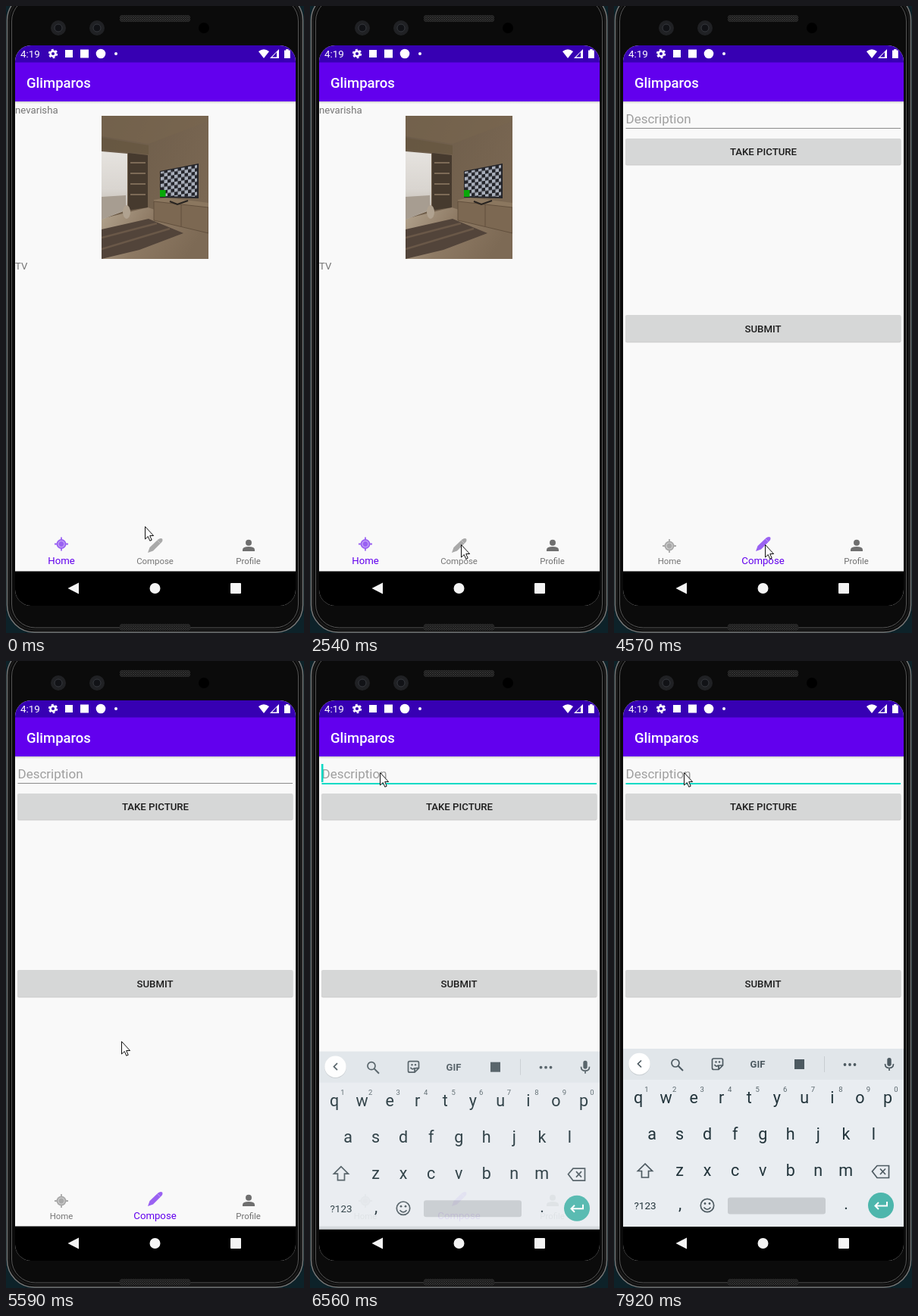
An HTML page that plays this animation: 393 px wide and 828 px high, repeating every 8 s.

```html
<!DOCTYPE html>
<html lang="en">
<head>
<meta charset="utf-8">
<title>Phone demo</title>
<style>
html, body { margin: 0; width: 100%; height: 100%; overflow: hidden; background: #0b0b0b; }
svg { display: block; width: 393px; height: 828px; font-family: Roboto, sans-serif; }
.mid { text-anchor: middle; }
.btn { font-size: 13.2px; font-weight: 500; fill: #1c1c1c; text-anchor: middle; }
.line { fill: none; stroke: #4d5a61; stroke-width: 1.7; }
.tab { fill: currentColor; }
</style>
</head>
<body>
<svg viewBox="0 0 393 828">
  <defs>
    <clipPath id="screen"><rect x="12" y="52" width="370" height="740" rx="21"/></clipPath>
    <clipPath id="page"><rect x="12" y="127" width="370" height="620"/></clipPath>
    <clipPath id="photoBox"><rect x="126" y="145" width="141" height="189"/></clipPath>
    <pattern id="checker" width="9" height="9" patternUnits="userSpaceOnUse" patternTransform="translate(204 217) skewY(-9)">
      <rect width="9" height="9" fill="#24252b"/>
      <path d="M0 0h4.5v9H9V4.5H0z" fill="#a9afbb"/>
    </pattern>
    <pattern id="mesh" width="3" height="3" patternUnits="userSpaceOnUse">
      <rect width="3" height="3" fill="#171717"/><path d="M0 0L3 3M3 0L0 3" stroke="#393939" stroke-width=".7"/>
    </pattern>
    <linearGradient id="shade" x2="0" y2="1"><stop stop-color="#cdcdcd"/><stop offset="1" stop-color="#f9f9f9"/></linearGradient>
    <linearGradient id="wall" x2="1" y2=".6"><stop stop-color="#6a5a48"/><stop offset="1" stop-color="#7b6853"/></linearGradient>
    <linearGradient id="floor" x2="1" y2=".3"><stop stop-color="#b3a48f"/><stop offset=".5" stop-color="#8d7963"/><stop offset="1" stop-color="#7d6a55"/></linearGradient>
    <linearGradient id="glass" x2="0" y2="1"><stop stop-color="#e6e3df"/><stop offset=".55" stop-color="#d9d5d0"/><stop offset="1" stop-color="#b9b0a5"/></linearGradient>
  </defs>

  <!-- phone body -->
  <rect width="393" height="828" fill="#0d2229"/>
  <g fill="#0b0b0b">
    <rect x="1.500" y="-17" width="390" height="844" rx="36" stroke="#777" stroke-width="1.500"/>
    <rect x="4" y="-14" width="385" height="838" rx="34" stroke="#1b1b1b" stroke-width="2"/>
    <rect x="7.500" y="-11" width="378" height="832" rx="31" stroke="#555"/>
  </g>
  <rect x="150" y="12" width="93" height="9" rx="3" fill="url(#mesh)"/>
  <rect x="150" y="816" width="93" height="9" rx="3" fill="url(#mesh)"/>
  <g fill="#202124"><circle cx="69" cy="29" r="10"/><circle cx="120" cy="29" r="10"/></g>
  <g fill="#111216" stroke="#36393e"><circle cx="69" cy="29" r="5"/><circle cx="120" cy="29" r="5"/></g>
  <circle cx="261" cy="29" r="7" fill="#000"/>

  <g clip-path="url(#screen)">
    <rect x="12" y="52" width="370" height="740" fill="#f9f9f9"/>
    <rect x="12" y="126" width="370" height="3" fill="url(#shade)"/>
    <rect x="12" y="74" width="370" height="52" fill="#6200ee"/>
    <rect x="12" y="52" width="370" height="22.5" fill="#3700b3"/>
    <g fill="#fff">
      <text x="19" y="68" font-size="13.4">4:19</text>
      <circle cx="62" cy="63" r="3.4" fill="none" stroke="#fff" stroke-width="2.6"/>
      <circle cx="62" cy="63" r="5.3" fill="none" stroke="#fff" stroke-width="1.8" stroke-dasharray="2.8 2.75"/>
      <rect x="78" y="58" width="10" height="10"/>
      <rect x="98" y="57.5" width="11" height="11"/>
      <circle cx="125" cy="63" r="6.3"/>
      <circle cx="145" cy="63" r="2"/>
      <path d="M333 60Q340 54.5 347 60L340 69z"/>
      <path d="M360 57V69H348z"/><path d="M357 61V67.5H351z" fill="#3700b3"/>
      <path d="M367 58.5h2.2V57h3.4v1.5h2.2V69H367z"/>
      <text x="27" y="108" font-size="18.5" font-weight="500">Glimparos</text>
    </g>

    <!-- feed -->
    <g id="feed" font-size="13.2" fill="#757575">
      <text x="12" y="141.5">nevarisha</text>
      <g clip-path="url(#photoBox)">
        <rect x="126" y="145" width="141" height="189" fill="url(#wall)"/>
        <path d="M126 145H267V152L188 182L126 172z" fill="#78674f" fill-opacity=".6"/>
        <path d="M126 174L188 184V196L126 190z" fill="#66563f" fill-opacity=".7"/>
        <path d="M126 281L187 266L267 292V334H126z" fill="url(#floor)"/>
        <path d="M126 192L160 195V269L126 282z" fill="url(#glass)"/>
        <path d="M126 252L158 250V269L126 282z" fill="#a79d91"/>
        <path d="M161 194L187 197V266L161 270z" fill="#463a2e"/>
        <path d="M164 207H184M164 221H184M164 235H184M164 249H184" stroke="#7d6b57" stroke-width="2"/>
        <path d="M126 295L188 281L234 300L176 322L126 334z" fill="#52443a"/>
        <path d="M126 306L199 287M126 321L216 294" stroke="#6a5848" stroke-width="2.500"/>
        <path d="M195 256L212 253L267 260V299L195 283z" fill="#8b775f"/>
        <path d="M195 258L267 266V300L195 283zM231 262V291" fill="#7c6852" stroke="#5b4938" stroke-width=".8"/>
        <ellipse cx="159" cy="272" rx="5" ry="9" fill="#b0a290"/>
        <path d="M203 218L254 208V254L203 253z" fill="#25252a"/>
        <path d="M204 219L252 210V252L204 251z" fill="url(#checker)"/>
        <path d="M216 258L226 262L240 257" fill="none" stroke="#272320" stroke-width="2"/>
        <rect x="203" y="243" width="7.5" height="9" fill="#08a808"/>
      </g>
      <text x="12" y="348">TV</text>
    </g>

    <!-- compose form -->
    <g id="form">
      <text x="15.5" y="154.500" font-size="17" fill="#9f9f9f">Description</text>
      <rect id="underline" x="15.5" y="161" width="362.5"/>
      <rect id="caret" x="15" y="136" width="2.500" height="24" fill="#03dac5"/>
      <g fill="#d0d0d0"><rect x="15" y="176" width="363.5" height="34.5" rx="2"/><rect x="15" y="409" width="363.5" height="35.5" rx="2"/></g>
      <g fill="#d6d7d7"><rect x="15" y="175" width="363.5" height="34" rx="2"/><rect x="15" y="408" width="363.5" height="35" rx="2"/></g>
      <text class="btn" x="197" y="197">TAKE PICTURE</text>
      <text class="btn" x="196.5" y="431">SUBMIT</text>
    </g>

    <!-- tabs -->
    <circle id="ripple" cx="197" cy="719.5" r="65.5" fill="#dbdbdb" clip-path="url(#page)"/>
    <g id="homeIcon" class="tab">
      <circle r="6.5"/>
      <path d="M0-9V9M-9 0H9" stroke="currentColor" stroke-width="1.8"/>
      <circle r="4" fill="none" stroke="#fff" stroke-opacity=".45" stroke-width="1.2"/>
    </g>
    <text id="homeLabel" class="mid" x="73" y="737">Home</text>
    <g id="composeIcon" class="tab">
      <path d="M-10 10L-7.5 3L3.5-7.5Q6.5-10 9-8.5Q10.5-6 7.5-3L-3 7.5z"/>
      <path d="M2.5-6.5L6.5-2.5" stroke="#fff" stroke-opacity=".35"/>
    </g>
    <text id="composeLabel" class="mid" x="196.5" y="737">Compose</text>
    <g fill="#6f6f6f">
      <circle cx="320" cy="708.7" r="4"/>
      <path d="M312 720V718Q312 714 320 714T328 718V720z"/>
      <text class="mid" x="319.5" y="737" font-size="11.4">Profile</text>
    </g>
    <rect x="12" y="746.500" width="370" height="46"/>

    <!-- keyboard -->
    <g id="keyboard" fill="#22343b">
      <rect x="12" y="512" width="370" height="235" fill="#e9edf1"/>
      <rect x="12" y="512" width="370" height="41" fill="#e1e6ea"/>
      <circle cx="33.5" cy="533" r="14.3" fill="#c9ced2"/>
      <circle cx="33.5" cy="532" r="14.2" fill="#fff"/>
      <g class="line">
        <path d="M36 527.5L31.5 532L36 536.5"/>
        <circle cx="81" cy="531" r="5"/><path d="M84.7 534.7L91 541" stroke-width="2"/>
        <path d="M131.5 525H141.5Q143.5 525 143.5 527V534L138 539.5H131.5Q129.5 539.5 129.5 537.5V527Q129.5 525 131.5 525zM143 534H140Q138 534 138 536V539M132.5 533Q135 537 138 533.5"/>
        <path d="M277.5 522V543" stroke="#c8cdd1" stroke-width="1"/>
        <path d="M357.5 532Q357.5 537.5 363 537.5T368.5 532M363 537.5V541"/>
        <path d="M41 664L31.5 673.5H36.5V682H45.5V673.5H50.5z"/>
        <path d="M340.5 674L347 666.5H362.5V682.5H347zM351 670.5L358 678M358 670.5L351 678"/>
        <circle cx="123" cy="719" r="8.7"/><path d="M118.5 721.5Q123 727 127.5 721.5"/>
      </g>
      <g fill="#4d5a61">
        <circle cx="134.5" cy="529.5" r="1.2"/><circle cx="139" cy="529.5" r="1.2"/>
        <text class="mid" x="189.5" y="537" font-size="13" font-weight="700">GIF</text>
        <rect x="238" y="526" width="13" height="13"/>
        <circle cx="304.5" cy="533" r="1.9"/><circle cx="311" cy="533" r="1.9"/><circle cx="317.5" cy="533" r="1.9"/>
        <rect x="360.3" y="524" width="5.4" height="11" rx="2.7"/>
        <circle cx="120" cy="716.5" r="1.4"/><circle cx="126" cy="716.5" r="1.4"/>
      </g>
      <text class="mid" x="41" y="724" font-size="13.5">?123</text>
      <rect x="150" y="708.5" width="129" height="22" rx="3" fill="#c8ccd0"/>
      <circle cx="352" cy="719" r="17" fill="#4db6ac"/>
      <path d="M360 714V719.5H345M349 715L344.5 719.5L349 724" fill="none" stroke="#fff" stroke-width="2"/>
      <g id="keys" class="mid" font-size="21.5"></g>
    </g>

    <g fill="#f4f4f4">
      <path d="M81.5 769L96 761.5V776.5z"/><circle cx="196.5" cy="769" r="7"/><rect x="296" y="762" width="14" height="14" rx="1"/>
    </g>
  </g>
  <path id="pointer" d="M.5 .5V17L4.3 13.5L6.8 19.3L9.2 18.2L6.7 12.5H11.6z" fill="#fff" stroke="#111"/>
</svg>
<script>
const LOOP = 8000;
const $ = id => document.getElementById(id);
const set = (id, attrs) => { for (const k in attrs) $(id).setAttribute(k, attrs[k]); };
const show = (id, on) => { $(id).style.display = on ? '' : 'none'; };

// time, x, y of each pointer jump
const pointerPath = [
  [0, 183, 687], [150, 198, 695], [300, 207, 704], [2420, 203, 708],
  [2540, 199, 711], [5590, 152, 502], [5740, 82, 167], [5890, 92, 147]
];

function addKeys() {
  const key = (label, x, y, extra = '') => `<text x="${x}" y="${y}" ${extra}>${label}</text>`;
  const row = (letters, x, y) => [...letters].map((c, i) => key(c, x + 36.55 * i, y)).join('');
  const digits = [...'1234567890'].map((d, i) =>
    key(d, 43 + 36.55 * i, 569, 'font-size="9.5" fill="#59666c"')).join('');
  $('keys').innerHTML = row('qwertyuiop', 32, 584) + row('asdfghjkl', 50, 632) +
    row('zxcvbnm', 86.5, 680) + key(',', 87, 724) + key('.', 306, 724) + digits;
}

function drawTab(name, x, y, iconColor, size, labelColor) {
  set(name + 'Icon', { transform: `translate(${x} ${y})`, color: iconColor });
  set(name + 'Label', { 'font-size': size, fill: labelColor });
}

function render(t) {
  const composing = t >= 4260, switching = composing && t < 4410;
  const focused = t >= 6290, sliding = t < 6710;
  const [, x, y] = pointerPath.findLast(p => p[0] <= t);
  set('pointer', { transform: `translate(${x} ${y})` });

  show('feed', !composing);
  show('form', composing);
  show('ripple', switching);
  if (!composing) {
    drawTab('home', 73, 710.5, '#9a62f2', 13.2, '#6200ee');
    drawTab('compose', 197, 712, '#a9a9a9', 11.4, '#757575');
  } else if (switching) {
    drawTab('home', 73, 711.5, '#adadad', 12.6, '#c9c9c9');
    drawTab('compose', 197, 711.5, '#9258ea', 12, '#b592ee');
  } else {
    drawTab('home', 73, 713, '#a9a9a9', 11.4, '#757575');
    drawTab('compose', 197, 710, '#9a62f2', 13.2, t < 4570 ? '#7a2af0' : '#6200ee');
  }

  set('underline', focused ? { height: 2, fill: '#03dac5' } : { height: 1, fill: '#8c8c8c' });
  show('caret', focused && t < 6990 || t >= 7390 && t < 7920);
  show('keyboard', t >= 6560);
  set('keyboard', { opacity: sliding ? 0.92 : 1, transform: `translate(0 ${sliding ? 3.7 : 0})` });
}

function tick() {
  render(performance.now() % LOOP);
  requestAnimationFrame(tick);
}

addKeys();
tick();
</script>
</body>
</html>
```
